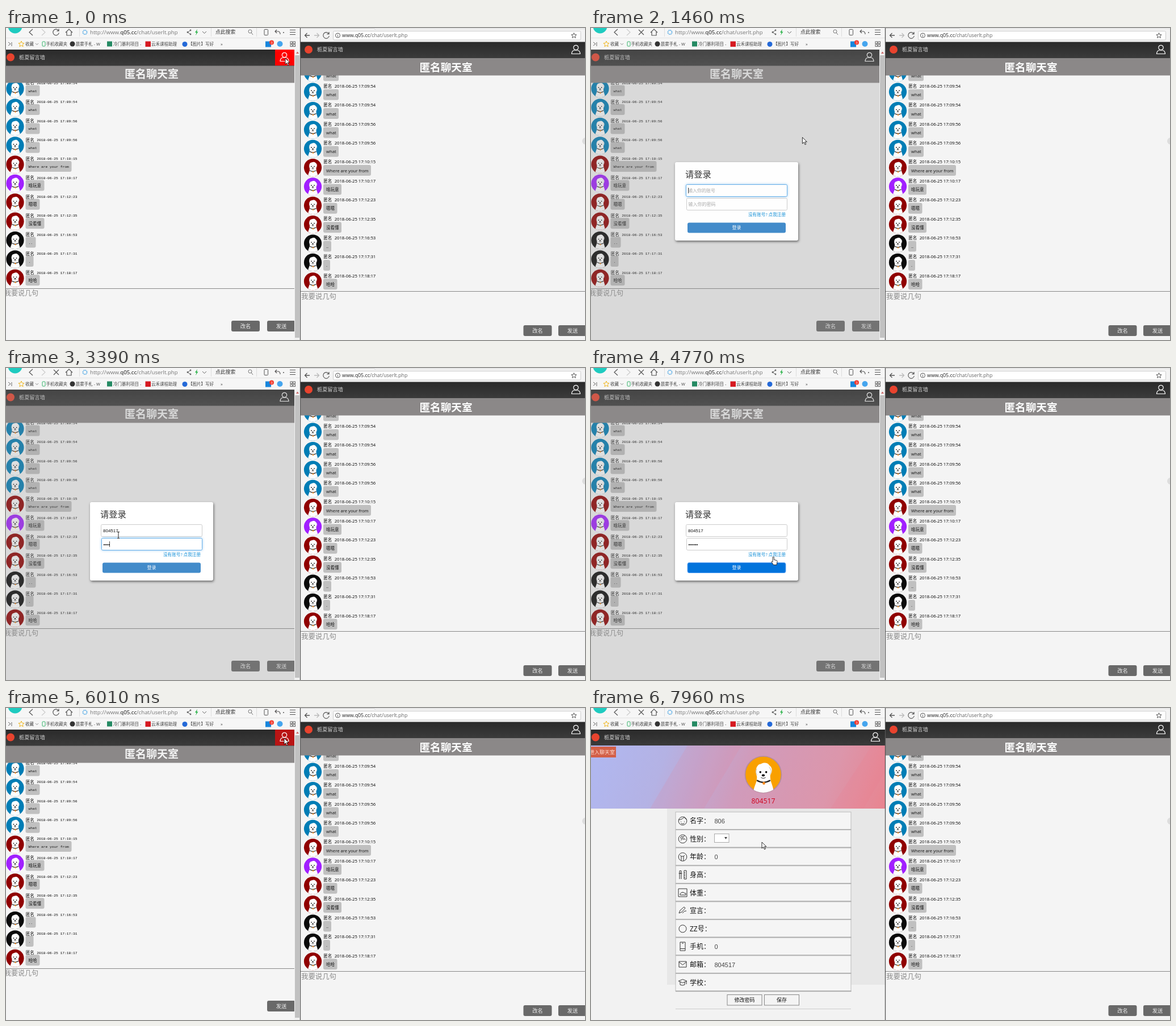
Animation of 1020 by 549 pixels, one loop 8 s. Source, as an HTML page:

```html
<!DOCTYPE html>
<html lang="zh">
<head>
<meta charset="utf-8">
<title>匿名聊天室</title>
<style>
html, body { margin: 0; width: 100%; height: 100%; overflow: hidden; background: #f4f4f4; }
svg { display: block; width: 100%; height: 100%; }
text { font-family: "Open Sans", "Noto Sans CJK SC", "Noto Sans CJK", sans-serif; white-space: pre; }
.mono { font-family: "Liberation Mono", "Noto Sans CJK SC", "Noto Sans CJK", monospace; }
.arial { font-family: "Liberation Sans", "Noto Sans CJK SC", "Noto Sans CJK", sans-serif; }
.shadow { filter: drop-shadow(1px 2px 2px #0008); }
</style>
</head>
<body>
<svg id="stage" viewBox="0 0 1020 549" preserveAspectRatio="none">
  <defs>
    <linearGradient id="bar" x2="0" y2="1"><stop stop-color="#2a2a2a"/><stop offset="1" stop-color="#3b3b3b"/></linearGradient>
    <linearGradient id="card" x2="1" y2="1"><stop stop-color="#a6b8fe"/><stop offset=".5" stop-color="#d39bbd"/><stop offset="1" stop-color="#fb7c7c"/></linearGradient>
    <linearGradient id="hero" gradientUnits="userSpaceOnUse" x1="0" y1="66" x2="505" y2="250">
      <stop stop-color="#b0b8f1"/><stop offset=".24" stop-color="#b4b2e4"/><stop offset=".5" stop-color="#d09bbb"/>
      <stop offset=".78" stop-color="#dc96ab"/><stop offset="1" stop-color="#ea828c"/>
    </linearGradient>
    <clipPath id="disc"><circle r="31"/></clipPath>
    <g id="dog" clip-path="url(#disc)">
      <path d="M-17 32C-16 17-10 15-11 3C-15-7-11-18-4-18C1-21 8-20 10-16C17-11 15-4 12 1C11 13 17 17 18 32Z" fill="#fdfdfd"/>
      <path d="M-11-10Q-14-3-10 1M10-13Q16-6 11 0" fill="none" stroke="#ccc"/>
      <circle cx="-5" cy="-4" r="1.7"/><circle cx="5" cy="-4" r="1.7"/>
      <ellipse cy="1.5" rx="2.6" ry="1.9"/><path d="M-4 5Q0 8 4 5" fill="none" stroke="#444"/>
      <path d="M-11 10Q0 17 12 10" fill="none" stroke="#222" stroke-width="2.2"/>
      <circle cx="1" cy="15" r="2.4" fill="#f58a1f"/>
    </g>
    <g id="user" fill="none" stroke="#fff" stroke-width="1.2"><circle cy="-3.5" r="4.2"/><path d="M-7.5 7.5Q-7 1.5-2.5 1H2.5Q7 1.5 7.5 7.5Z"/></g>
  </defs>
</svg>
<script>
const stage = document.getElementById('stage');
const rect = (x, y, w, h, fill, extra = '') => `<rect x="${x}" y="${y}" width="${w}" height="${h}" fill="${fill}" ${extra}/>`;
const circle = (x, y, r, fill, extra = '') => `<circle cx="${x}" cy="${y}" r="${r}" fill="${fill}" ${extra}/>`;
const line = (d, color = '#666', width = 1) => `<path d="${d}" fill="none" stroke="${color}" stroke-width="${width}"/>`;
// y is the vertical middle of the text
const text = (x, y, str, size, fill = '#111', extra = '') =>
  `<text x="${x}" y="${y + size * .37}" font-size="${size}" fill="${fill}" ${extra}>${str}</text>`;
const centered = (x, y, str, size, fill, extra = '') => text(x, y, str, size, fill, `text-anchor="middle" ${extra}`);
const group = (id, ...parts) => `<g id="${id}">${parts.join('')}</g>`;
const use = (id, x, y, scale = 1) => `<use href="#${id}" transform="translate(${x} ${y}) scale(${scale})"/>`;
const avatar = (x, y, r, color, border = '') => circle(x, y, r, color, border) + use('dog', x, y, r / 31);
const button = (x, y, w, h, label, size, fill, color = '#fff', extra = '') =>
  rect(x, y, w, h, fill, extra) + centered(x + w / 2, y + h / 2, label, size, color);

const SITE = '栀夏留言墙', ACCOUNT = '804517', NICKNAME = '806';
const BLUE = '#007db5', RED = '#900000', PURPLE = '#a120ff', BLACK = '#0a0a0a';
// avatar colour, time, message, bubble width left and right
const messages = [
  [BLUE, '09:54', 'what', 25, 27], [BLUE, '09:54', 'what', 25, 27], [BLUE, '09:54', 'what', 25, 27],
  [BLUE, '09:56', 'what', 25, 27], [BLUE, '09:56', 'what', 25, 27],
  [RED, '10:15', 'Where are your from', 81, 84], [PURPLE, '10:17', '啥玩意', 33, 32],
  [RED, '12:23', '嗯嗯', 25, 24.5], [RED, '12:35', '没看懂', 33, 32],
  [BLACK, '16:53', '..', 18, 14], [BLACK, '17:31', '.', 14, 12], [RED, '18:17', '哈哈', 25, 24.5]
];

function chatRow([color, time, message, leftWidth, rightWidth], i, isLeft) {
  const x = isLeft ? 16 : 540.5, y = (isLeft ? 73.3 : 78.8) + i * 33.36;
  const font = isLeft ? 'class="mono"' : '', latin = isLeft ? 6.25 : 7.7;
  const size = /[a-z.]/.test(message) ? latin : 7.5;
  const bubble = y - (isLeft ? 6 : 4.5);
  return avatar(x, y, 15.6, color) +
    text(x + 18.7, y - 10, '匿名', 7.5) +
    text(x + 38.2, y - 10, '2018-06-25 17:' + time, latin, '#000', font) +
    rect(x + 18.5, bubble, isLeft ? leftWidth : rightWidth, 19, '#c0c0c0', 'rx="3"') +
    text(x + 23.5, bubble + 9.7, message, size, '#111', font);
}
const chatRows = isLeft => messages.map((m, i) => isLeft && !i ? '' : chatRow(m, i, isLeft)).join('');
const grayButton = (x, y, label) => button(x, y, 50, 19, label, 9.3, '#696969', '#eee', 'rx="3"');
const siteHeader = (x, y, w, inset) => rect(x, y, w, 28.5, 'url(#bar)') + circle(x + inset + 8, y + 13.5, 7, '#e8432e') +
  text(x + inset + 23, y + 13.5, SITE, 9.2, '#ccc');
const reloadIcon = (x, y) => line(`M${x + 4.5} ${y - 3}A5.3 5.3 0 1 0 ${x + 5.3} ${y + 1}M${x + 5} ${y - 6}v3.6h-3.6`, '#555', 1.2);

const leftChat = group('chat',
  rect(0, 38, 518, 511, '#f5f5f5'), chatRows(true),
  rect(0, 65.5, 508, 31, '#8b8888'), centered(256.5, 81, '匿名聊天室', 19, '#f4f4f4', 'font-weight="600"'),
  line('M0 458.5H508', '#888'), text(-3, 467, '我要说几句', 12, '#888'),
  group('rename', grayButton(397, 515, '改名')), grayButton(460, 515, '发送'),
  siteHeader(0, 38, 508, 0), rect(474, 38, 34, 28, '#f00', 'id="hover"'), use('user', 490.5, 51),
  rect(0, 66, 508, 483, '#a1a1a1', 'id="menuShade"'), rect(0, 38, 508, 511, '#8d8d8d', 'id="dialogShade" opacity=".27"'),
  rect(508, 38, 10, 511, '#f1f1f1'), rect(509, 48, 8, 497, '#c1c1c1'), '<path d="M511 45l2.5-3.5 2.5 3.5z" fill="#c66"/>');

const guestMenu = group('guestMenu',
  rect(352, 66, 156, 108, '#f4f4f4', 'rx="2" stroke="#ccc" stroke-width=".6"'),
  avatar(430, 105, 32, '#f9a000', 'stroke="#adadad" stroke-width="2"'),
  centered(430, 146, '匿名', 9.2, '#ff5722'), line('M352 154.5H508', '#777'),
  button(399, 158, 28, 13, '登录', 7.6, '#1890ff'), button(433, 158, 28, 13, '注册', 7.6, '#1890ff'));

const glyphs = [
  circle(369, 179.5, 4, '#fff'),
  line('M366 205.5q0 6 6 6.5', '#fff', 2.4),
  rect(365.5, 235, 7.5, 5.5, '#fff') + line('M365.5 235l3.8 3 3.7-3', '#000', .8)
];
const userMenu = group('userMenu',
  rect(352, 66, 156, 213, '#f4f4f4', 'rx="2" stroke="#ccc" stroke-width=".6"'), rect(352, 66, 156, 88.5, 'url(#card)'),
  avatar(430, 104.5, 31.5, '#171717', 'stroke="#bbb" stroke-width="1.6"'),
  centered(430, 146, ACCOUNT, 9.2, '#f5382c'), line('M352 154.5H508', '#777'), text(353, 161, '基本资料', 7.5),
  [['ZZ:', ''], ['手机:', '0'], ['邮箱:', ACCOUNT]].map(([label, value], i) => {
    const y = 168 + i * 29;
    return rect(357, y, 146, 23, '#fff', 'class="shadow"') + circle(369, y + 11.5, 8, '#000') + glyphs[i] +
      text(i ? 380 : 384, y + 11.5, label, 7.4) + text(405, y + 11.5, value, 6.25, '#444', 'class="mono"');
  }).join(''),
  button(383, 256, 44, 19, '修改资料', 7.5, '#1890ff'), button(433, 256, 44, 19, '退出登录', 7.5, '#1890ff'));

const field = (id, x, y, w, h) => rect(x, y, w, h, '#fff', `id="${id}" rx="2"`);
const dialog = group('dialog',
  rect(148, 236, 217, 138, '#fff', 'rx="3" class="shadow"'), text(166, 257, '请登录', 15.3, '#333'),
  field('accountBox', 167.5, 275.5, 178, 21), field('passwordBox', 168.5, 299.5, 177, 21),
  text(171, 286, '', 8, '', 'id="account" class="arial"'), text(171.5, 310, '', 8, '', 'id="password" class="arial"'),
  rect(171, 281, .8, 10, '#222', 'id="caret"'),
  text(343, 328, '没有账号? 点我注册', 7.6, '#1590d8', 'text-anchor="end"'),
  rect(170, 342.5, 173, 18, '#428bca', 'id="submit" rx="3"'), centered(256.5, 351.5, '登录', 8, '#fff'));

const fields = [
  ['名字', NICKNAME, 'M154.5 197q7-1 10-5 2 4 4 4M158 200h1M164 200h1M158.5 203q3 2 6 0'],
  ['性别', '', 'M158 198a2 2 0 1 1 4 0a2 2 0 1 1-4 0M162 197l4-3M162 202a2 2 0 1 1 4 0M158 203l2-2'],
  ['年龄', '0', 'M159 269v-8l-2-2M163 269v-8l2-2M159 261h4'],
  ['身高', '', 'M156 286.5h3v4h-3zM156 291v10M159 291v10M154.5 291h6M164 286v15h4v-15zM164 290h2M164 294h2M164 298h2'],
  ['体重', '', 'M154 318h15v14h-15zM157 327q4-5 8-1h2v3h-10z'],
  ['宣言', '', 'M155 361l2-5 7-6 2 2-6 7zM161 361q4-5 7-4'],
  ['ZZ号', '', ''],
  ['手机', '0', 'M157 412h9v15h-9zM157 423.5h9M160 414h3'],
  ['邮箱', ACCOUNT, 'M155 446h13v10h-13zM155 447l6.5 5 6.5-5'],
  ['学校', '', 'M154 480.5l7.5-3 7.5 3-7.5 3zM157 482v5q4 2 8 0v-5M168 481v5']
];
const ringed = [0, 1, 2, 6];
const profile = group('profile',
  rect(0, 38, 518, 511, '#f2f2f2'), rect(134, 177, 384, 310, '#e7e7e7'), siteHeader(0, 38, 518, 0), use('user', 501, 51),
  rect(0, 66, 518, 111, 'url(#hero)'),
  '<path d="M170 66h95l-66 111h-95zM495 66h23v46l-38 65h-58z" fill="#ef7585" opacity=".13"/>',
  rect(-2, 68, 46, 19, '#d35f47'), text(-3, 77.5, '进入聊天室', 9, '#ffe1d6'),
  avatar(303.5, 117, 32, '#f9a000', 'stroke="#b58b9d" stroke-width="1.6"'),
  centered(303.5, 163, ACCOUNT, 12.2, '#d0001c'),
  fields.map(([label, value, icon], i) => {
    const y = 183 + i * 31.6, mid = y + 15.8;
    return rect(149, y, 309, 30.5, '#f5f5f5', 'stroke="#bbb"') + line(`M149 ${y + 31}H458.5`, '#aaa', 1.6) +
      (ringed.includes(i) ? circle(161.5, mid, i === 6 ? 6.5 : 7.3, 'none', 'stroke="#333"') : '') +
      `<g transform="translate(0 ${i === 1 ? 30 : 0})">${line(icon, '#333')}</g>` +
      text(174, mid, label + '：', 12) + text(217.5, mid, value, 11, '#444', 'class="arial"');
  }).join(''),
  rect(217.5, 221.5, 25.5, 15, '#fff', 'stroke="#aaa"'), '<path d="M235 227h5l-2.5 4z" fill="#444"/>',
  button(240, 504.5, 61, 18.5, '修改密码', 9, '#f4f4f4', '#111', 'stroke="#888"'),
  button(305.5, 504.5, 61, 18.5, '保存', 9, '#f4f4f4', '#111', 'stroke="#888"'),
  line('M149 529.5H458', '#ccc'));

const bookmark = (x, label) => text(x, 28, label, 7.5, '#444');
const leftToolbar = group('leftToolbar',
  rect(0, 0, 518, 38, '#f6f6f6'), line('M0 17.5H518', '#e3e3e3'), circle(16, -3, 12.5, '#1fcbc0'),
  line('M47 2l-6 5.5 6 5.5', '#555', 1.2), line('M63 2l6 5.5-6 5.5', '#ccc', 1.2),
  group('reload', reloadIcon(88, 7.5)), group('stop', line('M84 3l9 9M93 3l-9 9', '#555', 1.2)),
  line('M105 8l6-6 6 6M107 7v6h8v-6', '#555', 1.2), line('M129.5 0v15M361.5 0v15M441.5 0v15', '#ddd'),
  circle(139, 7.5, 3.6, 'none', 'stroke="#68b4e8" stroke-width="1.8" stroke-dasharray="2 .8"'),
  text(148, 7, '<tspan>http://www.</tspan><tspan fill="#111">q05.cc</tspan><tspan>/chat/</tspan><tspan id="pageName"></tspan>', 9.7, '#777'),
  line('M325 4l-5 3.5 5 3.5', '#666'), [[325, 4], [320, 7.5], [325, 11]].map(p => circle(...p, 1.4, '#666')).join(''),
  '<path d="M337 2l-4 6h2.5l-1.5 5 4.5-6.5h-2.5z" fill="#2cb34a"/>', line('M346 6l3.5 3.5 3.5-3.5'),
  text(369, 7, '点此搜索', 8.8, '#333'), circle(430, 6, 3, 'none', 'stroke="#777"'), line('M432 8l3 4', '#777'),
  rect(455, 2.5, 6.5, 10, 'none', 'rx="1" stroke="#555"'), line('M477 3l-3 3 3 3M474 6h6q3 1 3 5', '#555', 1.2), circle(489, 8, 1, '#555'),
  line('M500 3.5h10M500 7.5h10M500 11.5h10', '#555', 1.2),
  line('M4 25l4 3-4 3M10 25v7'), '<path d="M27 23l1.5 3.5 3.5.3-2.7 2.3.8 3.6-3.1-2-3.1 2 .8-3.6-2.7-2.3 3.5-.3z" fill="none" stroke="#f0b51b"/>',
  bookmark(34, '收藏'), line('M52 27l2.5 2.5 2.5-2.5', '#888'),
  rect(64, 24, 5, 8, 'none', 'rx="1" stroke="#36b36a"'), bookmark(70.5, '手机收藏夹'),
  circle(117, 28, 4.5, '#333'), bookmark(122.8, '晨雾手札 - W'),
  rect(178, 23.5, 9, 9, '#258a63'), bookmark(189, '冷门暴利项目 -'),
  rect(245.5, 23.5, 9.5, 9.5, '#d61920'), bookmark(256, '云禾课程助理'),
  circle(315, 28.5, 4.5, '#2469d8'), bookmark(321, '【图片】写好'), bookmark(378, '»'),
  rect(457, 23.5, 10, 10, '#1686dd'), circle(468, 25.5, 4, '#f23d30'), centered(468, 25.5, '3', 5.5, '#fff'),
  circle(482.5, 28, 5, '#45a5ee'),
  [[501, 24], [506, 24], [501, 29], [506, 29]].map(([x, y]) => rect(x, y, 3.5, 3.5, 'none', 'stroke="#666"')).join(''));

const rightWindow = group('right',
  rect(519, 0, 501, 549, '#f4f4f4'), chatRows(false),
  rect(519, 0, 501, 25, '#f3f3f3'), line('M519 .5H648l3 2', '#ccc'), line('M651 1.5H1020', '#ddd'),
  line('M535 13h-8M530.5 9l-4 4 4 4', '#555', 1.3), line('M543 13h8M547.5 9l4 4-4 4', '#bbb', 1.3), reloadIcon(564, 13),
  rect(576.5, 5.5, 436, 15.5, '#fff', 'rx="2" stroke="#ccc"'),
  circle(584.5, 13, 4, 'none', 'stroke="#555"'), line('M584.5 12.5v3M584.5 10.5v1', '#555'),
  text(592, 13, '<tspan fill="#222">www.q05.cc</tspan>/chat/userlt.php', 8.85, '#666'),
  '<path d="M1000.5 8.5l1.3 3.2 3.3.2-2.6 2.2.9 3.3-2.9-1.9-2.9 1.9.9-3.3-2.6-2.2 3.3-.2z" fill="none" stroke="#555"/>',
  siteHeader(519, 24.5, 501, 6), use('user', 1004, 38),
  rect(519, 53, 501, 30.5, '#8b8888'), centered(775, 69, '匿名聊天室', 18.6, '#fff', 'font-weight="700"'),
  line('M519 463.5H1020', '#888'), text(520, 472.5, '我要说几句', 12.4, '#888'),
  grayButton(911.5, 523, '改名'), grayButton(973, 523, '发送'), circle(1021, 199, 6, '#ddd'), line('M518.5 0V549', '#555', 1.3));

const cursor = group('cursor',
  '<path id="arrow" d="M0 0v11l2.6-2.4 2 4.2 1.8-.8-2-4.1h3.6z" fill="#fff" stroke="#000" stroke-width=".8"/>',
  group('ibeam', line('M-2-5.5h4M-2 5.5h4M0-5.5v11', '#222')),
  '<path id="hand" d="M-1 0q1.2-1.5 2.3 0v4.5l5 1.3q1 .5.7 2l-1 5.7h-5.5l-3.7-5q0-1.8 2.2-.2z" fill="#fff" stroke="#000" stroke-width=".8"/>');

stage.insertAdjacentHTML('beforeend', leftChat + guestMenu + userMenu + dialog + profile + leftToolbar + rightWindow + cursor);

const el = Object.fromEntries([...stage.querySelectorAll('[id]')].map(e => [e.id, e]));
const show = (id, on) => el[id].setAttribute('display', on ? 'inline' : 'none');
const set = (id, name, value) => el[id].setAttribute(name, value);
const between = (t, a, b) => t >= a && t < b;
const fadeIn = (t, start) => Math.min(1, Math.max(0, (t - start) / 280 + .5));

const LOOP = 8000;
// bursts of screen updates: start, end, number of updates
const bursts = [[160, 1160, 8], [1310, 2280, 8], [2560, 2560, 1], [2840, 3540, 6],
  [4100, 5040, 8], [5160, 6160, 8], [6310, 6970, 6], [7270, 7960, 6]];
function lastUpdate(t) {
  const burst = bursts.findLast(b => t >= b[0]);
  if (!burst) return 0;
  const [start, end, count] = burst, step = (end - start) / (count - 1 || 1);
  return start + step * Math.min(count - 1, Math.floor((t - start + 10) / (step || 1)));
}

const pointer = [[0, 492, 53], [160, 492, 53], [874, 421, 159], [1017, 416, 167], [1310, 416, 167], [2003, 198, 294],
  [4100, 198, 294], [4369, 256, 350], [4503, 256, 350], [4771, 321, 333], [5160, 400, 220], [6017, 490, 53],
  [6160, 490, 53], [6574, 433, 219], [6970, 404, 264], [7270, 404, 264], [7960, 301, 236], [LOOP, 301, 236]];
function pointerAt(t) {
  const i = Math.max(1, pointer.findIndex(k => k[0] >= t)), [t0, x0, y0] = pointer[i - 1], [t1, x1, y1] = pointer[i];
  const p = (t - t0) / (t1 - t0);
  return [x0 + (x1 - x0) * p, y0 + (y1 - y0) * p];
}

function fillField(id, value, placeholder) {
  el[id].textContent = value || placeholder;
  set(id, 'fill', value ? '#111' : '#aaa');
}
function focusField(id, focused) {
  set(id, 'stroke', focused ? '#66afe9' : '#ccc');
  el[id].style.filter = focused ? 'drop-shadow(0 0 2px #66afe9aa)' : 'none';
}

function render(time) {
  const t = lastUpdate(time);
  const guest = between(t, 160, 1160), member = between(t, 6160, 7270), login = between(t, 1310, 4900);
  show('guestMenu', guest); show('userMenu', member); show('dialog', login); show('profile', t >= 7270);
  show('rename', t < 5040);
  show('menuShade', guest || member);
  const menuFade = fadeIn(t, guest ? 160 : 6160);
  set('menuShade', 'opacity', .18 * menuFade);
  set('guestMenu', 'opacity', menuFade); set('userMenu', 'opacity', menuFade);
  show('dialogShade', between(t, 1160, 4900));
  set('dialog', 'opacity', fadeIn(t, 1310));
  show('hover', t < 160 || between(t, 6000, 6160));
  set('hover', 'fill', t < 160 ? '#f00' : '#b91414');

  const typed = t < 2560 ? 0 : t < 2840 ? 2 : t < 2970 ? 4 : 6;
  const dots = t < 3250 ? 0 : t < 3390 ? 2 : t < 3530 ? 4 : 6;
  fillField('account', ACCOUNT.slice(0, typed), '输入你的账号');
  fillField('password', '•'.repeat(dots), '输入你的密码');
  const onPassword = t >= 3110, submitted = t >= 4360;
  focusField('accountBox', !onPassword); focusField('passwordBox', onPassword && !submitted);
  show('caret', !submitted);
  set('caret', 'x', 171 + (onPassword ? dots * 2.8 : typed * 4.45));
  set('caret', 'y', onPassword ? 305 : 281);
  set('submit', 'fill', submitted ? '#0073dc' : '#428bca');
  set('submit', 'stroke', submitted ? '#65a9f5' : 'none');

  const loading = between(t, 1010, 5040) || t >= 7270;
  show('stop', loading); show('reload', !loading);
  el.pageName.textContent = t >= 7270 ? 'user.php' : 'userlt.php';

  const ibeam = between(t, 1720, 4230), hand = between(t, 4230, 4900);
  show('ibeam', ibeam); show('hand', hand); show('arrow', !ibeam && !hand);
  set('cursor', 'transform', `translate(${pointerAt(t)})`);
}

const begin = performance.now();
function frame() {
  render((performance.now() - begin) % LOOP);
  requestAnimationFrame(frame);
}
frame();
</script>
</body>
</html>
```
